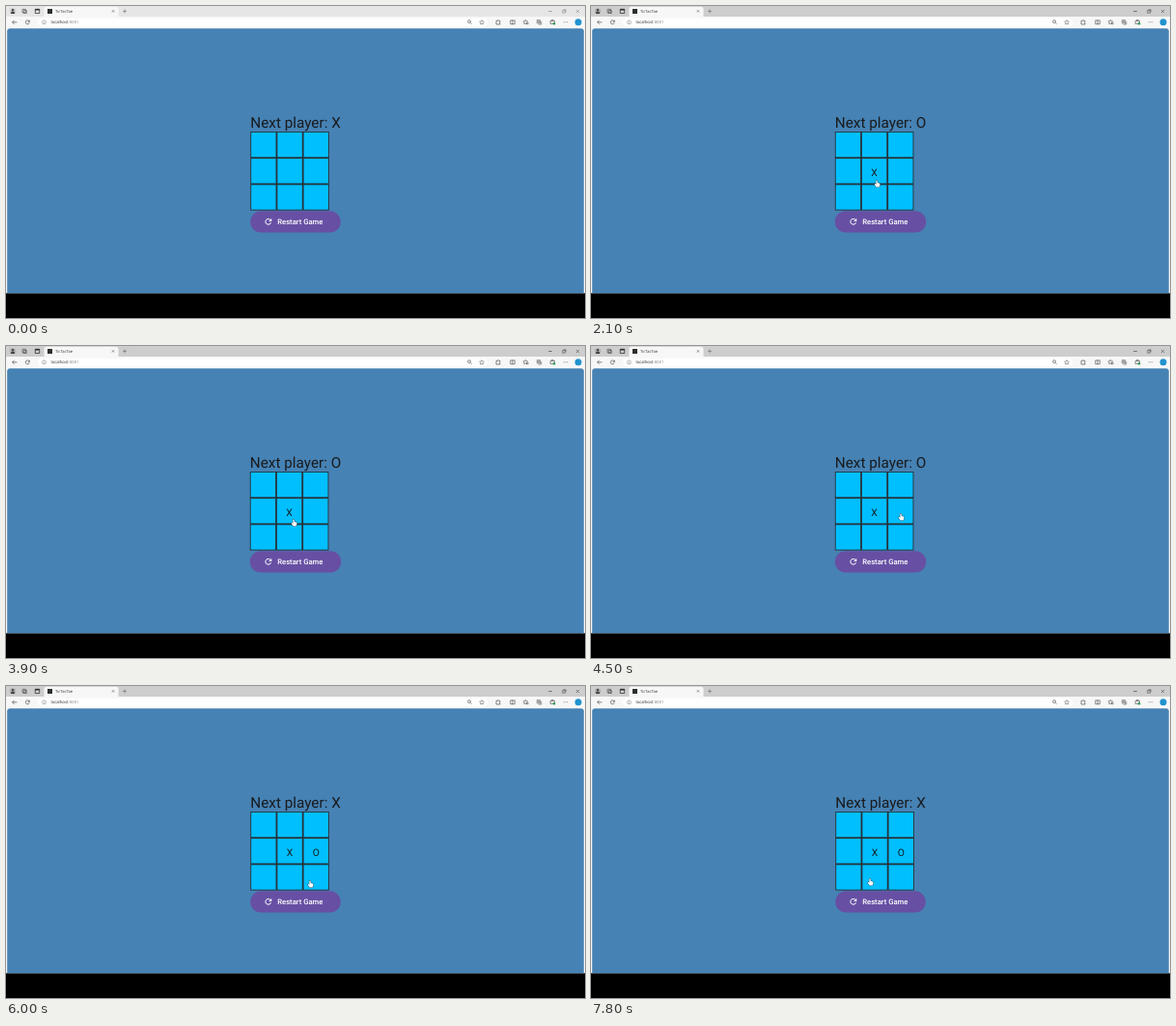
An HTML page with a canvas that plays this animation: 600x323 px, repeating every 8 s.

```html
<!DOCTYPE html>
<html lang="en">
<head>
<meta charset="utf-8">
<title>TicTacToe</title>
<style>
  html, body { margin: 0; width: 100%; height: 100%; overflow: hidden; background: #000; }
  canvas { display: block; width: 600px; height: 323px; }
</style>
</head>
<body>
<canvas id="stage"></canvas>
<script>
const W = 600, H = 323, LOOP = 8000, STEP = 100;
const FOCUS_AT = 1600, REPLY_AT = 4600, ENTER_AT = 300;
const CELL = 27.2, BOARD_Y = 130;

// Pointer stops: time, x, y
const STOPS = [
  [300, 338, 292], [700, 295, 205], [900, 285, 186], [1100, 295, 203],
  [1400, 295, 203], [1600, 295, 178], [2100, 297, 184], [2400, 297, 184],
  [2800, 330, 206], [3200, 321, 202], [3600, 304, 196], [3900, 299, 183],
  [4100, 301, 182], [4500, 322, 177], [4800, 320, 179], [5200, 295, 181],
  [5600, 300, 197], [6000, 316, 205], [6400, 323, 202], [6800, 308, 203],
  [7200, 299, 206], [7700, 290, 203]
];

const canvas = document.getElementById('stage');
const ctx = canvas.getContext('2d');
const ratio = window.devicePixelRatio || 1;
canvas.width = W * ratio;
canvas.height = H * ratio;

function rect(x, y, w, h, color) {
  ctx.fillStyle = color;
  ctx.fillRect(x, y, w, h);
}

function round(x, y, w, h, r, color) {
  ctx.beginPath();
  ctx.roundRect(x, y, w, h, r);
  ctx.fillStyle = color;
  ctx.fill();
}

function disc(x, y, r, color) {
  ctx.beginPath();
  ctx.arc(x, y, r, 0, 7);
  ctx.fillStyle = color;
  ctx.fill();
}

function line(d, color, width = 0.6, x = 0, y = 0) {
  ctx.save();
  ctx.translate(x, y);
  ctx.strokeStyle = color;
  ctx.lineWidth = width;
  ctx.stroke(new Path2D(d));
  ctx.restore();
}

function text(str, x, y, font, color, align = 'left') {
  ctx.font = font;
  ctx.fillStyle = color;
  ctx.textAlign = align;
  ctx.fillText(str, x, y);
}

function reload(x, y, r, color, width) {
  ctx.beginPath();
  ctx.arc(x, y, r, 0.3, Math.PI * 1.75);
  ctx.strokeStyle = color;
  ctx.lineWidth = width;
  ctx.stroke();
  ctx.beginPath();
  ctx.moveTo(x + r * 1.2, y - r * 1.2);
  ctx.lineTo(x + r * 1.2, y - r * 0.1);
  ctx.lineTo(x + r * 0.1, y - r * 0.1);
  ctx.fillStyle = color;
  ctx.fill();
}

function drawTabs(active) {
  const ink = active ? '#333' : '#777';
  rect(0, 0, W, 12, active ? '#cdcdcd' : '#e6e6e6');
  disc(7, 5.3, 3.3, active ? '#b4b4b4' : '#cfcfcf');
  disc(7, 4.2, 1.2, '#444');
  round(4.9, 5.8, 4.2, 2.2, [1.5, 1.5, 0.6, 0.6], '#444');
  line('M-2 -2h3.4v3.6h-3.4zM-.7 -.8h3v3h-3z', '#444', 0.6, 19, 5.3);
  line('M-2.2 -2h4.4v4.2h-4.4z', '#222', 0.7, 32.5, 5.3);
  rect(30.3, 3.2, 4.4, 1.3, '#222');

  round(39.5, 0.8, 77, 12, [2.5, 2.5, 0, 0], '#f7f7f7');
  rect(43, 3, 5, 5, '#2b2f2b');
  text('TicTacToe', 51, 7, '4.1px "Open Sans", sans-serif', '#333');
  line('M-1.2 -1.2l2.4 2.4M1.2 -1.2l-2.4 2.4', '#444', 0.5, 111, 5.4);
  line('M-2 0h4M0 -2v4', '#555', 0.5, 123, 5.4);

  line('M-1.8 0h3.6', ink, 0.6, 564, 5.5);
  line('M-1.6 -.9h2.6v2.6h-2.6zM-.8 -1.7h2.6v2.6', ink, 0.5, 578.3, 5.5);
  line('M-1.6 -1.6l3.2 3.2M1.6 -1.6l-3.2 3.2', ink, 0.5, 592.5, 5.5);
}

function drawToolbar() {
  const ink = '#444';
  rect(0, 11, W, 14, '#f7f7f7');
  round(33, 12.8, 466, 8.4, 4.2, '#fff');
  line('M2.4 0h-4.8M-.4 -2l-2 2l2 2', ink, 0.65, 9, 16.8);
  reload(22.3, 16.8, 2, ink, 0.65);

  ctx.beginPath();
  ctx.arc(39.5, 16.8, 2, 0, 7);
  ctx.strokeStyle = '#777';
  ctx.lineWidth = 0.5;
  ctx.stroke();
  line('M0 -1.1v.5M0 -.2v1.4', '#777', 0.5, 39.5, 16.8);

  const font = '4.3px "Open Sans", sans-serif';
  text('localhost', 46.5, 18.3, font, '#222');
  text(':8081', 46.5 + ctx.measureText('localhost').width, 18.3, font, '#888');

  const star = 'M0 -2.3l.7 1.5l1.7 .2l-1.2 1.1l.3 1.7l-1.5 -.8l-1.5 .8l.3 -1.7l-1.2 -1.1l1.7 -.2z';
  line('M1.2 -.5a1.6 1.6 0 1 1 -3.2 0a1.6 1.6 0 1 1 3.2 0M.8 .7l1.5 1.5M-1.2 -.5h1.6', '#555', 0.55, 480.5, 16.6);
  line(star, '#555', 0.5, 493, 16.8);
  line('M-2 -1.4h1.2a.8 .8 0 0 1 1.6 0h1.2v1.3a.7 .7 0 0 0 0 1.3v1h-4z', ink, 0.65, 510, 16.8);
  line('M-2.3 -1.9h4.6v3.8h-4.6zM0 -2.3v4.6', ink, 0.6, 525, 16.8);
  line(star, ink, 0.55, 538.3, 16.5);
  line('M1 .6h2M.6 1.9h2.4', ink, 0.55, 538.6, 16.8);
  line('M-2.2 -2.2h3.2v3.2h-3.2zM2.2 -1v3.2h-3.2M-.6 -1.6v2M-1.6 -.6h2', ink, 0.55, 552.5, 16.8);
  line('M-2.2 -1.2h4.4v3h-4.4zM-.8 -1.2v-1h1.6v1', ink, 0.6, 566.3, 16.6);
  disc(568, 18.2, 1.3, '#2e9b57');
  for (const x of [578.2, 580, 581.8]) disc(x, 16.8, 0.45, ink);
  disc(593, 16.8, 3.5, '#2193cf');
}

function drawGame(t) {
  const next = t >= FOCUS_AT && t < REPLY_AT ? 'O' : 'X';
  const title = 'Next player: ' + next;
  const font = '15.3px Roboto, sans-serif';
  ctx.font = font;
  const width = ctx.measureText(title).width;
  const left = W / 2 - width / 2;
  text(title, left, 126, font, '#191b1e');

  rect(left, BOARD_Y, CELL * 3, CELL * 3, '#26323a');
  for (let i = 0; i < 9; i++) {
    const x = left + (i % 3) * CELL, y = BOARD_Y + Math.floor(i / 3) * CELL;
    rect(x + 0.9, y + 0.9, CELL - 1.8, CELL - 1.8, '#00bfff');
  }
  const mark = (str, col) =>
    text(str, left + CELL * (col + 0.5), 175.8, '10.4px Roboto, sans-serif', '#15191c', 'center');
  if (t >= FOCUS_AT) mark('X', 1);
  if (t >= REPLY_AT) mark('O', 2);

  round(left, 212.3, width, 22.2, 11.1, '#6750a4');
  reload(271.8, 223.3, 2.9, '#fff', 1);
  text('Restart Game', 281.2, 226.1, '500 7.7px Roboto, sans-serif', '#fff');
}

function pointerAt(t) {
  const i = STOPS.findIndex(stop => stop[0] > t);
  if (i < 0) return STOPS[STOPS.length - 1].slice(1);
  const [t0, x0, y0] = STOPS[i - 1], [t1, x1, y1] = STOPS[i];
  const p = (t - t0) / (t1 - t0), k = p * p * (3 - 2 * p);
  return [x0 + (x1 - x0) * k, y0 + (y1 - y0) * k];
}

const HAND = new Path2D('M-1.6 -2.9a.65 .65 0 0 1 1.3 0v1.9l2 .4q.9 .2 .8 1.1l-.4 1.7l-.5 1.3h-2.8l-1.9 -2.5q-.4 -.9 .5 -.9l1 .7z');
const ARROW = new Path2D('M-2 -3.5v6.2l1.5 -1.4l1 2.2l.9 -.4l-1 -2.1h2z');

function drawPointer(t) {
  if (t < ENTER_AT) return;
  const [x, y] = pointerAt(t);
  const overBoard = x > 253 && x < 335 && y > 130 && y < 212;
  const overButton = x > 253 && x < 347 && y >= 212 && y < 234;
  const shape = overBoard || overButton ? HAND : ARROW;
  ctx.save();
  ctx.translate(x, y);
  ctx.lineJoin = 'round';
  ctx.lineWidth = 0.7;
  ctx.strokeStyle = '#222';
  ctx.stroke(shape);
  ctx.fillStyle = '#fff';
  ctx.fill(shape);
  ctx.restore();
}

function draw(now) {
  const t = Math.floor((now % LOOP) / STEP) * STEP;
  ctx.setTransform(ratio, 0, 0, ratio, 0, 0);
  ctx.textRendering = 'geometricPrecision';
  rect(0, 0, W, H, '#000');
  drawTabs(t >= FOCUS_AT);
  drawToolbar();
  rect(0, 24, W, 273.3, '#f7f7f7');
  round(1.2, 23.2, 597.6, 274.1, [3, 3, 0, 0], '#4682b4');
  drawGame(t);
  drawPointer(t);
}

const start = performance.now();
function tick() {
  draw(performance.now() - start);
  requestAnimationFrame(tick);
}
tick();
</script>
</body>
</html>
```
